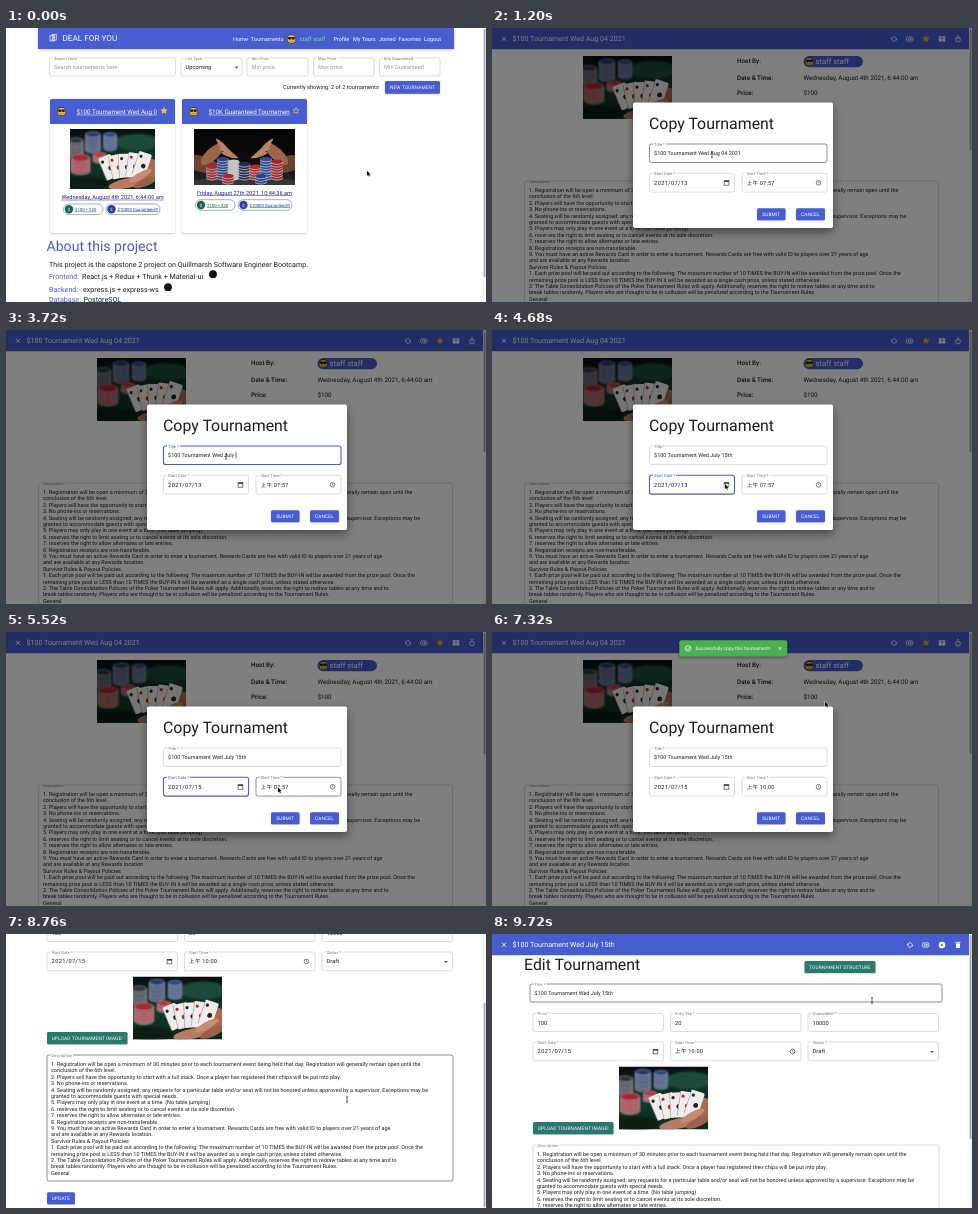
Write an HTML page with a canvas that moves like this. It is 480 px wide and 274 px high and loops after 9780 ms.

```html
<!DOCTYPE html>
<html lang="en">
<head>
<meta charset="utf-8">
<title>Tournament copy demo</title>
<style>
html, body { margin: 0; width: 100%; height: 100%; overflow: hidden; background: #fff; }
canvas { display: block; width: 480px; height: 274px; }
</style>
</head>
<body>
<canvas id="stage"></canvas>
<script>
const W = 480, H = 274, LOOP = 9780;
const BLUE = '#475dd0', TEAL = '#2b786e', INK = '#1c1c1c', GREY = '#777', LINK = '#20208c';
const FONT = 'Roboto, "Noto Sans CJK TC", "Noto Sans CJK SC", "Noto Sans CJK", sans-serif';
const USER = 'staff staff', SITE = 'DEAL FOR YOU', SCHOOL = 'Quillmarsh';

const canvas = document.getElementById('stage');
const dpr = window.devicePixelRatio || 1;
canvas.width = W * dpr;
canvas.height = H * dpr;
const c = canvas.getContext('2d');

const RULES = `1. Registration will be open a minimum of 30 minutes prior to each tournament event being held that day. Registration will generally remain open until the
conclusion of the 6th level.
2. Players will have the opportunity to start with a full stack. Once a player has registered their chips will be put into play.
3. No phone-ins or reservations.
4. Seating will be randomly assigned; any requests for a particular table and/or seat will not be honored unless approved by a supervisor. Exceptions may be
granted to accommodate guests with special needs.
5. Players may only play in one event at a time. (No table jumping)
6. reserves the right to limit seating or to cancel events at its sole discretion.
7. reserves the right to allow alternates or late entries.
8. Registration receipts are non-transferable.
9. You must have an active Rewards Card in order to enter a tournament. Rewards Cards are free with valid ID to players over 21 years of age
and are available at any Rewards location.
Survivor Rules & Payout Policies
1. Each prize pool will be paid out according to the following: The maximum number of 10 TIMES the BUY-IN will be awarded from the prize pool. Once the
remaining prize pool is LESS than 10 TIMES the BUY-IN it will be awarded as a single cash prize, unless stated otherwise.
2. The Table Consolidation Policies of the Poker Tournament Rules will apply. Additionally, reserves the right to redraw tables at any time and to
break tables randomly. Players who are thought to be in collusion will be penalized according to the Tournament Rules.
General`.split('\n');

const clamp = (v, a = 0, b = 1) => Math.min(b, Math.max(a, v));
const smooth = v => v * v * (3 - 2 * v);
const ramp = (t, a, b) => smooth(clamp((t - a) / (b - a)));

function rect(x, y, w, h, fill, r = 0) {
  c.beginPath();
  c.roundRect(x, y, w, h, r);
  c.fillStyle = fill;
  c.fill();
}

function disc(x, y, rx, fill, ry = rx, turn = 0) {
  c.beginPath();
  c.ellipse(x, y, rx, ry, turn, 0, 7);
  c.fillStyle = fill;
  c.fill();
}

function line(points, color, width = .8, close = false) {
  c.beginPath();
  points.forEach(([x, y]) => c.lineTo(x, y));
  if (close) c.closePath();
  c.strokeStyle = color;
  c.lineWidth = width;
  c.stroke();
}

function ring(x, y, r, color, width = .8, from = 0, to = 7) {
  c.beginPath();
  c.arc(x, y, r, from, to);
  c.strokeStyle = color;
  c.lineWidth = width;
  c.stroke();
}

function text(str, x, y, size, color = INK, { weight = 400, align = 'left', under = false, gap = 0 } = {}) {
  c.font = `${weight} ${size}px ${FONT}`;
  c.textAlign = align;
  c.letterSpacing = gap + 'px';
  c.fillStyle = color;
  c.fillText(str, x, y);
  const w = c.measureText(str).width;
  if (under) rect(align === 'center' ? x - w / 2 : x, y + .8, w, .5, color);
  return w;
}

function shadowed(draw, blur, alpha, dy = 1) {
  c.save();
  c.shadowColor = `rgba(0,0,0,${alpha})`;
  c.shadowBlur = blur * dpr;
  c.shadowOffsetY = dy * dpr;
  draw();
  c.restore();
}

function button(label, x, y, w, h, fill = BLUE, size = 4.8) {
  shadowed(() => rect(x, y, w, h, fill, 1.5), 1.5, .25, .6);
  text(label, x + w / 2, y + h / 2 + size * .36, size, '#fff', { align: 'center', gap: .12 });
}

function field(label, value, x, y, w, h, { state = '', size = 5.45, color = INK, gap = 0, pad = 4.6 } = {}) {
  const edge = state === 'focus' ? BLUE : state === 'hover' ? '#444' : '#c4c4c4';
  c.beginPath();
  c.roundRect(x, y, w, h, 2);
  c.strokeStyle = edge;
  c.lineWidth = state === 'focus' ? 1.1 : .6;
  c.stroke();
  c.font = `400 4.1px ${FONT}`;
  c.letterSpacing = '0px';
  rect(x + pad - 1, y - 1.2, c.measureText(label).width + 2, 2.6, '#fff');
  text(label, x + pad, y + 1.5, 4.1, state === 'focus' ? BLUE : GREY);
  return text(value, x + pad, y + 11.4, size, color, { gap });
}

const dropArrow = (x, y) => {
  c.beginPath();
  [[x - 2, y - 1], [x + 2, y - 1], [x, y + 1.2]].forEach(p => c.lineTo(...p));
  c.fillStyle = '#666';
  c.fill();
};

function calendarIcon(x, y) {
  c.strokeStyle = '#222';
  c.lineWidth = .6;
  c.strokeRect(x - 2.4, y - 2, 4.8, 4.4);
  rect(x - 2.4, y - 2.2, 4.8, 1.2, '#222');
}

function clockIcon(x, y) {
  ring(x, y, 2.3, '#222', .6);
  line([[x, y - 1.4], [x, y], [x + 1, y + .6]], '#222', .5);
}

function dateField(value, x, y, w, opt) {
  field('Start Date *', value, x, y, w, 18.8, { ...opt, size: 5.7, gap: .35 });
  calendarIcon(x + w - 8, y + 9.5);
}

function timeField(value, x, y, w, opt) {
  field('Start Time *', '上午 ' + value, x, y, w, 18.8, { ...opt, size: 5.6, gap: .2 });
  clockIcon(x + w - 8.5, y + 9.5);
}

function star(x, y, r, color, hollow) {
  const pts = Array.from({ length: 10 }, (_, i) => {
    const a = -Math.PI / 2 + i * Math.PI / 5, k = i % 2 ? r * .45 : r;
    return [x + k * Math.cos(a), y + k * Math.sin(a)];
  });
  line(pts, color, .7, true);
  if (!hollow) { c.fillStyle = color; c.fill(); }
}

const cross = (x, y, r, color, width = .9) => {
  line([[x - r, y - r], [x + r, y + r]], color, width);
  line([[x + r, y - r], [x - r, y + r]], color, width);
};

function avatar(x, y, r = 4.4) {
  disc(x, y, r, '#23232b');
  disc(x, y, r * .88, '#f2c230');
  disc(x - r * .38, y - r * .15, r * .38, '#222', r * .3);
  disc(x + r * .38, y - r * .15, r * .38, '#222', r * .3);
  rect(x - r * .8, y - r * .38, r * 1.6, r * .2, '#222');
  ring(x, y + r * .1, r * .5, '#7a4a10', .5, .4, 2.7);
}

function syncIcon(x, y) {
  ring(x, y, 2.3, '#fff', .7, -2.4, .3);
  ring(x, y, 2.3, '#fff', .7, .75, 3.45);
  disc(x + 2.3, y + .8, .8, '#fff');
  disc(x - 2.3, y - .8, .8, '#fff');
}

function duplicateIcon(x, y) {
  ring(x + .6, y, 2.4, '#fff', .7);
  ring(x - .8, y, 3, '#fff', .7, 1.9, 4.4);
  line([[x - .8, y], [x + 2, y]], '#fff', .7);
  line([[x + .6, y - 1.4], [x + .6, y + 1.4]], '#fff', .7);
}

function clipped(x, y, w, h, draw) {
  c.save();
  c.beginPath();
  c.rect(x, y, w, h);
  c.clip();
  c.translate(x, y);
  draw();
  c.restore();
}

function gradientFill(w, h, ...stops) {
  const g = c.createLinearGradient(0, 0, 0, h);
  stops.forEach((color, i) => g.addColorStop(i / (stops.length - 1), color));
  c.fillStyle = g;
  c.fillRect(0, 0, w, h);
}

function stack(x, y, n, color, r = 6) {
  for (let i = 0; i < n; i++) {
    disc(x, y - i * 2.6, r, '#b9b9bb', r * .4);
    disc(x, y - i * 2.6 - .7, r * .95, color, r * .38);
  }
}

// Drawn in an 89 x 63 box.
function cardPhoto(x, y, w, h) {
  clipped(x, y, w, h, () => {
    c.scale(w / 89, h / 63);
    gradientFill(89, 63, '#080c0e', '#12382b', '#0d2a1c');
    c.filter = `blur(${dpr}px)`;
    disc(70, 14, 24, '#1d4a3c', 9);
    stack(24, 22, 7, '#23396c', 8);
    stack(42, 20, 6, '#2b4684', 7);
    stack(6, 26, 6, '#30323c', 8);
    stack(11, 44, 6, '#a3262d', 10);
    stack(31, 33, 3, '#b53438', 7);
    disc(16, 57, 24, '#0b1d14', 7);
    c.filter = 'none';
    disc(78, 46, 18, '#a8694f', 13, -.6);
    disc(60, 57, 20, '#b87a60', 5, -.2);
    ['#222', '#b22', '#222', '#b22', '#222'].forEach((pip, i) => {
      c.save();
      c.translate(40 + i * 8.5, 42 - i);
      c.rotate(-.4 + i * .18);
      rect(-6, -14, 14, 25, '#eeecea', 1.5);
      rect(-6, -14, .5, 25, '#888');
      disc(-2.6, -9, 1.6, pip);
      disc(2.8, 0, 2.4, pip);
      c.restore();
    });
    disc(74, 49, 13, '#c58c72', 3.6, -.5);
    disc(79, 56, 13, '#99604a', 4, -.4);
  });
}

// Drawn in a 101 x 56 box.
function chipsPhoto(x, y, w, h) {
  clipped(x, y, w, h, () => {
    c.scale(w / 101, h / 56);
    gradientFill(101, 56, '#050505', '#0c0b0b', '#26282b');
    for (const side of [-1, 1]) {
      const at = d => 50.5 + side * d;
      disc(at(43), 35, 18, '#6d4330', 8, -side * .25);
      disc(at(32), 25, 15, '#9a6549', 6, side * .75);
      for (let i = 0; i < 4; i++) disc(at(22 - i * 2.4), 16 + i * 3.4, 9, '#b98464', 1.8, -side * (.75 - i * .15));
    }
    disc(50, 54, 54, '#34363a', 6);
    ['#a82a2c', '#27458e', '#c9c6c2', '#252c50', '#b03030', '#2e4f9a', '#a02729']
      .forEach((color, i) => stack(18 + i * 10.8, 49, 5 + (i * 3) % 4, color, 6));
    stack(34, 53, 3, '#a82a2c', 6);
    stack(67, 53, 3, '#27458e', 6);
  });
}

function chip(x, y, w, color, label, mark) {
  c.beginPath();
  c.roundRect(x, y, w, 10.6, 5.3);
  c.strokeStyle = color;
  c.lineWidth = .45;
  c.stroke();
  disc(x + 5.5, y + 5.3, 4.2, color);
  text(mark, x + 5.5, y + 6.9, 4.2, '#fff', { align: 'center' });
  text(label, x + 11.5, y + 6.8, 4.25, color, { under: true });
}

function card(x, title, when, whenY, photo, hollow) {
  shadowed(() => rect(x, 71, 125, 134, '#fff', 1.5), 2, .25, .7);
  rect(x, 71, 125, 25, BLUE, [1.5, 1.5, 0, 0]);
  avatar(x + 11.5, 83.5);
  text(title, x + 26.5, 86, 6.25, '#fff', { under: true });
  star(x + 114, 82.8, 3.2, '#f5c542', hollow);
  photo();
  text(when, x + 62.5, whenY, 5.6, LINK, { align: 'center', under: true });
  chip(x + 13.5, whenY + 5, 39.5, '#1e6152', '$100 + $20', '$');
  chip(x + 56, whenY + 5, 54, '#24429a', '$10000 Guaranteed!!!', '$');
}

function homePage() {
  shadowed(() => rect(32, -2, 416, 23, BLUE), 3, .25);
  c.strokeStyle = '#fff';
  c.lineWidth = .7;
  c.strokeRect(44, 7.5, 4, 5.5);
  c.strokeRect(46.2, 6.6, 4, 5.5);
  disc(48.2, 9.4, .9, '#fff');
  text(SITE, 56.5, 13.4, 8.2, '#fff');
  [['Home', 227], ['Tournaments', 245], ['Profile', 327.5], ['My Tours', 347], ['Joined', 373], ['Favorites', 392.5], ['Logout', 418]]
    .forEach(([label, x]) => text(label, x, 12.6, 5.5, '#fff'));
  avatar(285.5, 11, 4.6);
  text(USER, 293.5, 12.6, 5.9, '#7fd67f');

  const hint = { size: 5.67, color: '#999' };
  field('Search Term', 'Search tournaments here.', 43.5, 30, 126, 18, hint);
  field('List Type', 'Upcoming', 175, 30, 61, 18, { size: 5.67 });
  dropArrow(230.5, 39.5);
  field('Min Price', 'Min price', 241, 30, 61, 18, hint);
  field('Max Price', 'Max price', 307.5, 30, 60.5, 18, hint);
  field('Min Guaranteed', 'Min Guaranteed', 373.5, 30, 60.5, 18, hint);
  text('Currently showing: 2 of 2 tournaments', 277, 61, 5.67);
  button('NEW TOURNAMENT', 379, 53, 55, 12.7);

  card(44, '$100 Tournament Wed Aug 0', 'Wednesday, August 4th 2021, 6:44:00 am', 171,
    () => cardPhoto(64, 101, 85, 60));
  card(176, '$10K Guaranteed Tournamen', 'Friday, August 27th 2021, 10:44:36 am', 166.7,
    () => chipsPhoto(188, 101, 101, 56), true);

  text('About this project', 40.5, 223.3, 14.1, BLUE);
  text(`This project is the capstone 2 project on ${SCHOOL} Software Engineer Bootcamp.`, 43, 239, 7.15);
  [['Frontend:', 'React.js + Redux + Thunk + Material-ui', 76, 251.3], ['Backend:', 'express.js + express-ws', 77, 264.2], ['Database:', 'PostgreSQL', 77.5, 274]]
    .forEach(([label, value, x, y]) => { text(label, 43, y, 7.15, BLUE); text(value, x, y, 7.15); });
  disc(207, 246.2, 3.9, '#111');
  disc(162, 259.2, 3.9, '#111');
  scrollbar(300);
}

function rules(x, y, boxX, boxY, boxW, boxH, state) {
  field('Description', '', boxX, boxY, boxW, boxH, { state });
  RULES.forEach((row, i) => text(row, x, y + i * 6.4, 5.48));
}

function scrollbar(pageHeight, scroll = 0) {
  const k = H / pageHeight;
  rect(477, 0, 3, H, '#f8f8f8');
  rect(477.7, scroll * k + 1, 1.8, H * k - 2, '#a8a8a8', .9);
}

function topBar(title) {
  rect(0, 0, 477, 21.3, BLUE);
  cross(12, 10.8, 2, '#fff');
  text(title, 20.5, 13.3, 7.1, '#fff');
}

function detailPage() {
  topBar('$100 Tournament Wed Aug 04 2021');
  syncIcon(402, 11);
  duplicateIcon(418, 11);
  star(434, 10.8, 3.2, '#f5a623');
  rect(446.8, 8.2, 6.4, 5.2, '#fff', .5);
  line([[447, 10.2], [453, 10.2]], BLUE, .6);
  line([[450, 8], [450, 13.5]], BLUE, .6);
  ring(466, 11.5, 2.4, '#fff');
  line([[465, 7.8], [467, 7.8]], '#fff');
  line([[466, 11.5], [466, 10]], '#fff', .6);

  cardPhoto(91, 28, 89, 63);
  ['Host By:', 'Date & Time:', 'Price:', 'Entry Fee:', 'Guaranteed:']
    .forEach((label, i) => text(label, 245, [34.8, 52, 67.3, 82.5, 97.8][i], 6.35, INK, { weight: 500 }));
  rect(311.5, 28, 59.5, 11.2, BLUE, 5.6);
  avatar(317.3, 33.6, 4.5);
  text(USER, 323.5, 36.2, 7.6, '#fff');
  text('Wednesday, August 4th 2021, 6:44:00 am', 311.5, 52, 6.3);
  ['$100', '$20', '$10000'].forEach((v, i) => text(v, 311.5, 67.3 + i * 15.25, 6.3));
  rules(37, 164, 32.5, 153, 414, 140);
  scrollbar(610);
}

function editPage(scroll) {
  c.save();
  c.translate(0, -scroll);
  topBar('$100 Tournament Wed July 15th');
  syncIcon(418, 11);
  duplicateIcon(434, 11);
  disc(450, 11, 3.2, '#fff');
  cross(450, 11, 1.2, BLUE, .8);
  rect(464, 9.3, 4, 4.7, '#fff', .6);
  rect(463.4, 7.9, 5.2, .8, '#fff');

  text('Edit Tournament', 32, 36.3, 15.9);
  button('TOURNAMENT STRUCTURE', 312.5, 27, 71, 12, TEAL);
  field('Title *', '$100 Tournament Wed July 15th', 38, 50, 412, 18, { state: scroll < 1 ? 'hover' : '' });
  const num = { size: 5.7 };
  field('Price *', '100', 41, 79.5, 130.5, 18, num);
  field('Entry Fee *', '20', 178.5, 79.5, 130.5, 18, num);
  field('Guaranteed *', '10000', 316, 79.5, 130.5, 18, num);
  dateField('2021/07/15', 41, 108, 130.5);
  timeField('10:00', 178.5, 108, 130.5);
  field('Status *', 'Draft', 316, 108, 130.5, 18.8, num);
  dropArrow(440, 118);
  cardPhoto(127, 132.5, 89, 63);
  button('UPLOAD TOURNAMENT IMAGE!', 41, 188, 80.5, 12.2, TEAL);
  rules(45, 222, 41, 211, 406, 126, scroll > 60 ? 'hover' : '');
  button('UPDATE', 41, 348.3, 28, 12);
  c.restore();
  scrollbar(364, scroll);
}

function typedTitle(t) {
  const base = '$100 Tournament Wed ', old = 'Aug 04 2021', fresh = 'July 15th';
  if (t < 2500) return base + old.slice(0, old.length - Math.round(clamp((t - 1500) / 800) * old.length));
  const n = t < 3750 ? clamp((t - 2600) / 900) * 5 : 5 + clamp((t - 3800) / 500) * 4;
  return base + fresh.slice(0, Math.floor(n));
}

function datePicker(t) {
  shadowed(() => rect(157, 166, 102, 94, '#fff', 1.5), 4, .35);
  text('2021年07月', 163, 175, 5.4, INK, { weight: 500 });
  dropArrow(200, 173);
  const cell = (i, row) => [168 + i * 13.4, 185 + row * 11.5];
  [...'日一二三四五六'].forEach((d, i) => text(d, cell(i, 0)[0], 186, 4.6, GREY, { align: 'center' }));
  const picked = t > 5040 ? 15 : 13;
  for (let day = 1; day <= 31; day++) {
    const slot = day + 3, [x, y] = cell(slot % 7, 1 + Math.floor(slot / 7));
    if (day === picked) rect(x - 5, y - 4.5, 10, 9, '#1a73e8', 1.5);
    text(day, x, y + 1.8, 5, day === picked ? '#fff' : INK, { align: 'center' });
  }
  text('今天', 163, 257.5, 4.8, '#1a73e8');
}

function dialog(t) {
  const shown = ramp(t, 880, 1020) * (1 - ramp(t, 7480, 7660));
  if (!shown) return;
  c.save();
  c.globalAlpha = shown;
  rect(0, 0, W, H, 'rgba(0,0,0,.5)');
  shadowed(() => rect(141, 74.5, 200, 125.5, '#fff', 2), 10, .45, 4);
  text('Copy Tournament', 157, 101.3, 15.9);

  const titleFocus = t > 1320 && t < 4650;
  const state = titleFocus ? 'focus' : t > 1100 && t < 4650 ? 'hover' : '';
  const width = field('Title *', typedTitle(t), 157.5, 116, 177.5, 18.5, { state });
  if (titleFocus && t % 1060 < 640) rect(162.3 + width, 122, .6, 6.5, INK);

  dateField(t > 5040 ? '2021/07/15' : '2021/07/13', 157.5, 145.3, 85, { state: t > 4650 && t < 5700 ? 'focus' : '' });
  const timeState = t > 5700 && t < 6900 ? 'focus' : t > 5400 && t < 5700 ? 'hover' : '';
  timeField(t > 6350 ? '10:00' : t > 6000 ? '10:57' : '07:57', 250, 145.3, 85, { state: timeState });
  button('SUBMIT', 265, 180.2, 28.5, 12);
  button('CANCEL', 304, 180.2, 29, 12);
  if (t > 4700 && t < 5220) datePicker(t);
  c.restore();
}

function snackbar(t) {
  const shown = ramp(t, 7060, 7200) * (1 - ramp(t, 7700, 7800));
  if (!shown) return;
  c.save();
  c.globalAlpha = shown;
  shadowed(() => rect(187.3, 8.3, 108, 16.2, '#4caf50', 2), 3, .4);
  ring(196, 16.4, 2.7, '#fff', .7);
  line([[194.7, 16.4], [195.8, 17.5], [198.4, 14.7]], '#fff', .7);
  text('Successfully copy this tournament!', 203.5, 18, 4.8, '#fff');
  cross(288, 16.4, 1.5, '#fff', .7);
  c.restore();
}

const PATH = [
  [0, 361, 142.8], [180, 361, 142.8], [420, 110, 84], [560, 110, 84], [840, 418, 11], [960, 418, 11],
  [1150, 220, 126.5], [4380, 220, 126.5], [4640, 233, 154], [4760, 233, 154], [5000, 224, 218], [5240, 224, 218],
  [5480, 272, 155.5], [6380, 272, 155.5], [6700, 279, 186], [6960, 279, 186], [7300, 333, 69.7], [7440, 333, 69.7],
  [7700, 341, 110], [8200, 341, 165.5], [9080, 341, 165.5], [9560, 380, 66.5], [LOOP, 380, 66.5]
];

function pointer(t) {
  const i = PATH.findIndex(p => p[0] > t);
  const [t0, x0, y0] = PATH[i - 1], [t1, x1, y1] = PATH[i];
  const k = ramp(t, t0, t1), x = x0 + (x1 - x0) * k, y = y0 + (y1 - y0) * k;
  const overText = (t > 1120 && t < 4420) || (t > 8400 && t < 9080) || t > 9540;
  if (overText) {
    line([[x, y - 2.6], [x, y + 2.6]], '#111', .7);
    line([[x - 1, y - 2.8], [x + 1, y - 2.8]], '#111', .6);
    line([[x - 1, y + 2.8], [x + 1, y + 2.8]], '#111', .6);
    return;
  }
  const shape = [[0, 0], [0, 5], [1.2, 4], [2, 5.8], [2.9, 5.4], [2.1, 3.7], [3.6, 3.6]];
  line(shape.map(([a, b]) => [x + a, y + b]), '#fff', .9, true);
  c.fillStyle = '#000';
  c.fill();
}

function render(t) {
  c.setTransform(dpr, 0, 0, dpr, 0, 0);
  c.textRendering = 'geometricPrecision';
  rect(0, 0, W, H, '#fff');
  if (t < 500) homePage();
  else if (t < 7800) detailPage();
  else editPage(90 * (ramp(t, 8250, 8650) - ramp(t, 9000, 9450)));
  dialog(t);
  snackbar(t);
  pointer(t);
}

const start = performance.now();
function tick() {
  render((performance.now() - start) % LOOP);
  requestAnimationFrame(tick);
}
tick();
</script>
</body>
</html>
```
